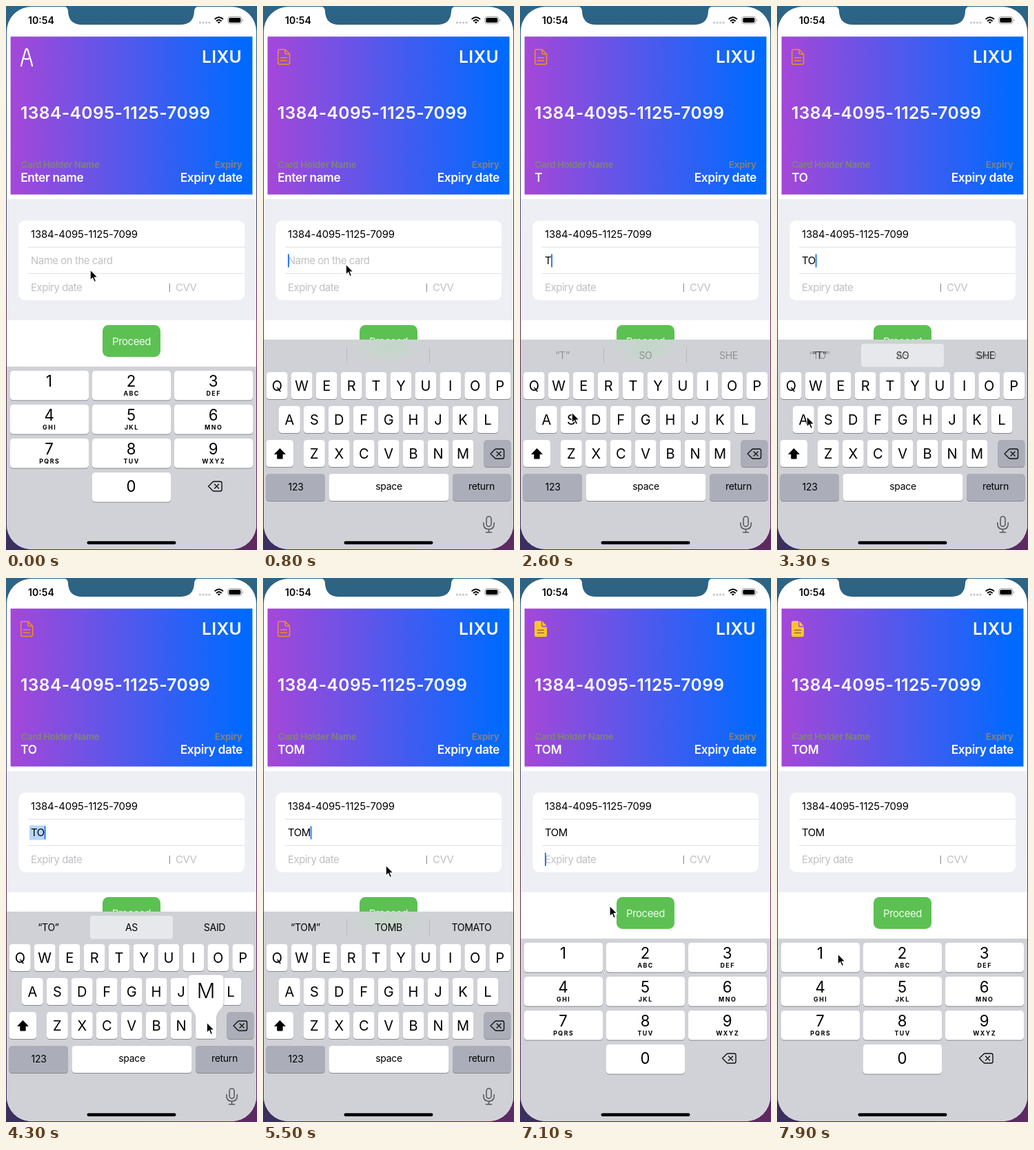
An HTML page that plays this animation: 364x786 px, repeating every 8 s.

```html
<!DOCTYPE html>
<html lang="en">
<head>
<meta charset="utf-8">
<title>Card form</title>
<style>
html, body { margin: 0; height: 100%; overflow: hidden; background: #3c2c5e; }
svg { display: block; width: 364px; height: 786px; }
text { font-family: Inter, "Open Sans", sans-serif; white-space: pre; }
.field { font-size: 14.9px; letter-spacing: -.029em; }
.label { font-size: 13.1px; font-weight: 700; letter-spacing: -.014em; fill: #808080; }
.value { font-size: 17.3px; font-weight: 600; letter-spacing: -.02em; fill: #fff; }
.big { font-size: 24.6px; font-weight: 600; letter-spacing: .016em; fill: #fff; }
.hint { fill: #c0c0c4; }
.digit { font-size: 22.2px; }
.abc { font-size: 8.8px; font-weight: 700; letter-spacing: 1.5px; }
.letter { font-size: 20px; }
.small { font-size: 14px; letter-spacing: -.02em; }
.mid { text-anchor: middle; }
.end { text-anchor: end; }
.line { fill: none; stroke-linecap: round; stroke-linejoin: round; }
</style>
</head>
<body>
<svg id="stage" viewBox="0 0 364 786">
  <defs>
    <linearGradient id="desk" gradientUnits="userSpaceOnUse" x1="0" y1="0" x2="0" y2="786">
      <stop offset="0" stop-color="#2b6587"/><stop offset=".3" stop-color="#3a4c70"/>
      <stop offset=".6" stop-color="#5c2b4b"/><stop offset="1" stop-color="#3a305f"/>
    </linearGradient>
    <linearGradient id="dusk">
      <stop offset=".5" stop-color="#6a2862" stop-opacity="0"/><stop offset="1" stop-color="#6a2862" stop-opacity=".75"/>
    </linearGradient>
    <linearGradient id="card">
      <stop offset="0" stop-color="#a547d8"/><stop offset=".94" stop-color="#0369ff"/>
      <stop offset="1" stop-color="#006aff"/>
    </linearGradient>
    <radialGradient id="glow">
      <stop offset="0" stop-color="#b4dcb8" stop-opacity=".55"/><stop offset="1" stop-color="#c6d8cb" stop-opacity="0"/>
    </radialGradient>
    <clipPath id="screen"><rect x="1" y="1" width="362" height="784" rx="36"/></clipPath>
  </defs>
  <rect width="364" height="786" fill="url(#desk)"/>
  <rect y="393" width="364" height="393" fill="url(#dusk)"/>
  <g clip-path="url(#screen)">
    <rect width="364" height="786" fill="#fff"/>
    <rect x="6.6" y="44.2" width="350.8" height="228.2" fill="url(#card)"/>
    <path id="compass" class="line" stroke="#fff" stroke-width="2.2"
      d="M22 86.5L24 78.5L28.5 63.5Q30 60 31.5 63.5L36 78.5L38 86.5M25.3 75.5Q30 78 34.7 75.5"/>
    <path id="outline" class="line" stroke="#f08c28" stroke-width="1.6"
      d="M24 62.8H32L38.6 69.5V82Q38.6 84.3 36.3 84.3H24Q21.8 84.3 21.8 82V65Q21.8 62.8 24 62.8ZM32 62.8V67.5Q32 69.5 34 69.5H38.6M25.5 74.8H34.5M25.5 79H34.5"/>
    <g id="filled">
      <path d="M23.5 62H31V68Q31 71 34 71H39V82.5Q39 85 36.5 85H23.5Q21 85 21 82.5V64.5Q21 62 23.5 62ZM32.3 62.3L38.8 69.4H34Q32.3 69.4 32.3 67.5Z" fill="#fac42c"/>
      <path class="line" d="M25.5 75.3H34.5M25.5 79.3H34.5" stroke="#86603e" stroke-width="1.3"/>
    </g>
    <text class="big end" x="342" y="82">LIXU</text>
    <text class="big" x="21" y="163.3">1384-4095-1125-7099</text>
    <text class="label" x="21.5" y="234">Card Holder Name</text>
    <text class="label end" x="342.5" y="234">Expiry</text>
    <text class="value" id="holder" x="21.2" y="254"></text>
    <text class="value end" x="343" y="254">Expiry date</text>

    <rect y="279" width="364" height="175" fill="#eeeff5"/>
    <rect x="18.5" y="310" width="327.5" height="115" rx="9" fill="#fff"/>
    <path d="M32 348.5H346M32 386.5H346" stroke="#e2e2e5"/>
    <rect id="mark" x="34" y="357.5" height="21" fill="#b8d5fa"/>
    <text class="field" x="36" y="334.8" style="letter-spacing:-.009em">1384-4095-1125-7099</text>
    <text class="field" id="name" x="36" y="373.3"></text>
    <text class="field hint" x="36" y="411.8">Expiry date</text>
    <path d="M237.3 401V413" stroke="#909094" stroke-width="1.2"/>
    <text class="field hint" x="246" y="411.8">CVV</text>
    <rect id="caret" width="1.8" height="19" fill="#1873e8"/>
    <rect x="140" y="461" width="84" height="46" rx="8.5" fill="#5cc152"/>
    <text class="field mid" x="182" y="489.8" fill="#f2fbf0">Proceed</text>
    <g id="numbers"></g>
    <g id="letters"></g>
    <rect x="117.5" y="773.3" width="129" height="4.4" rx="2.2"/>

    <text x="32" y="25.8" font-size="14.1" font-weight="600">10:54</text>
    <g fill="#c4c4c6"><circle cx="281.5" cy="24" r="1.6"/><circle cx="286" cy="24" r="1.6"/><circle cx="290.5" cy="24" r="1.6"/><circle cx="295" cy="24" r="1.6"/></g>
    <path class="line" d="M303.3 18.6Q308.8 13.8 314.3 18.6M305.6 21.4Q308.8 18.6 312 21.4" stroke="#000" stroke-width="2"/>
    <path d="M306.7 23.3Q308.8 21.7 310.9 23.3L308.8 25.6Z"/>
    <rect x="321.8" y="15.5" width="20" height="10" rx="3" fill="none" stroke="#999"/>
    <rect x="323.3" y="17" width="17" height="7" rx="1.8"/>
    <path d="M343.2 18.5Q345 20.5 343.2 22.5Z" fill="#999"/>
  </g>
  <path d="M82 0Q90 .5 90 8Q91 27 110 27H253Q272 27 273 8Q273 .5 281 0Z" fill="url(#desk)"/>
  <path id="pointer" d="M-.8 0V15.2L2.7 12 5.1 17.6 7.6 16.5 5.2 11H10Z" stroke="#fff" stroke-width="1.1"/>
</svg>
<script>
const $ = id => document.getElementById(id);
const KEY = "#fff", DARK = "#abaeb9";

const label = (s, x, y, cls, extra = "") => `<text class="${cls} mid" x="${x}" y="${y}" ${extra}>${s}</text>`;
const key = (x, y, w, h, fill = KEY) =>
  `<rect x="${x}" y="${y + 1}" width="${w}" height="${h}" rx="4.5" fill="#88898e"/>
   <rect x="${x}" y="${y}" width="${w}" height="${h}" rx="4.5" fill="${fill}"/>`;
const erase = (x, y) =>
  `<path class="line" transform="translate(${x} ${y})" stroke="#111" stroke-width="1.4"
    d="M-10 0L-4 -6Q-3 -7 -1.6 -7H7Q9.5 -7 9.5 -4.5V4.5Q9.5 7 7 7H-1.6Q-3 7 -4 6ZM-1 -3L5 3M5 -3L-1 3"/>`;

function numberPad() {
  const subs = ["", "ABC", "DEF", "GHI", "JKL", "MNO", "PQRS", "TUV", "WXYZ"];
  let s = `<rect y="521" width="364" height="265" fill="#d1d2d7"/>`;
  subs.forEach((sub, i) => {
    const x = 6 + i % 3 * 119, y = 527 + Math.floor(i / 3) * 49;
    s += key(x, y, 114, 42.5) + label(i + 1, x + 56.6, y + 23, "digit") + label(sub, x + 57.2, y + 36, "abc");
  });
  return s + key(125, 674, 114, 42.5) + label(0, 181.6, 702, "digit") + erase(303.5, 694);
}

function letterPad() {
  let s = `<rect y="482" width="364" height="304" fill="#d0d1d6"/>
    <ellipse cx="182" cy="492" rx="65" ry="30" fill="url(#glow)" clip-path="inset(20px 0 0 0)"/>
    <path id="dividers" d="M121.5 493V516M241.5 493V516" stroke="#b8b9be"/>
    <rect id="choice" x="122" y="488" width="120" height="33.5" rx="4" fill="#e7e8eb"/>
    <g id="words"></g>`;
  [["QWERTYUIOP", 20.3], ["ASDFGHJKL", 38.4], ["ZXCVBNM", 74.4]].forEach(([row, x0], r) => {
    [...row].forEach((c, i) => {
      const x = x0 + i * 35.93, y = 529 + r * 49;
      s += key(x - 15.4, y, 30.8, 39) + label(c, x, y + 26.6, "letter");
    });
  });
  s += key(4.5, 627, 39.5, 39) + `<path d="M24.5 639L33 647.7H28.7V653.5Q28.7 654.5 27.7 654.5H21.3Q20.3 654.5 20.3 653.5V647.7H16Z"/>`
    + key(320.3, 627, 39, 39, DARK) + erase(340, 647)
    + key(4.5, 676, 85.5, 39, DARK) + label("123", 47.5, 700, "small")
    + key(95.5, 676, 174, 39) + label("space", 182.5, 699.3, "small")
    + key(275, 676, 84.5, 39, DARK) + label("return", 317, 699.3, "small");
  s += `<g class="line" stroke="#55565b" stroke-width="1.5"><rect x="324" y="737.5" width="7" height="14.5" rx="3.5"/>
    <path d="M319.8 746.5V748Q319.8 756 327.5 756T335.2 748V746.5M327.5 756V760.5M323.5 760.5H331.5"/></g>`;
  return s + `<g id="popup"><path d="M270 573H310Q316 573 316 579V612C316 624 305.5 624 305.5 636V662Q305.5 666 301.5 666H278.5Q274.5 666 274.5 662V636C274.5 624 264 624 264 612V579Q264 573 270 573Z"
    fill="#fff" stroke="#b5b6bb" stroke-width=".7"/>${label("M", 290, 607.3, "", 'font-size="29.5" font-weight="300"')}</g>`;
}

$("numbers").innerHTML = numberPad();
$("letters").innerHTML = letterPad();

const LOOP = 8000, NAME_AT = 800, DATE_AT = 6000;
const typed = [[NAME_AT, ""], [2500, "T"], [3200, "TO"], [4400, "TOM"]];
const words = [[], ["“T”", "SO", "SHE"], ["“TO”", "AS", "SAID"], ["“TOM”", "TOMB", "TOMATO"]];
const path = [[0, 123, 381], [500, 121, 373], [900, 121, 373], [1900, 76, 587], [2600, 76, 587],
  [3100, 44, 593], [3500, 44, 593], [4200, 292, 642], [4500, 292, 642], [5400, 179, 415],
  [5600, 179, 415], [5900, 173, 404], [6500, 173, 404], [7700, 89, 543], [8000, 89, 543]];

const show = (id, on) => $(id).style.display = on ? "" : "none";
const clamp = v => Math.max(0, Math.min(1, v));

function pointerAt(t) {
  const i = path.findIndex(p => p[0] > t), [a, x0, y0] = path[i - 1], [b, x1, y1] = path[i];
  const p = (t - a) / (b - a), e = p * p * (3 - 2 * p);
  return [x0 + (x1 - x0) * e, y0 + (y1 - y0) * e];
}

const wordRow = (list, alpha) => list.map((w, i) =>
  label(w, 61.5 + i * 120.5, 510, "small", `opacity="${alpha}"`)).join("");

function draw(t) {
  const naming = t >= NAME_AT && t < DATE_AT, dating = t >= DATE_AT;
  const n = Math.max(0, typed.filter(k => t >= k[0]).length - 1);
  const [since, text] = typed[n];
  show("compass", t < NAME_AT);
  show("outline", naming);
  show("filled", dating);
  show("numbers", !naming);
  show("letters", naming);

  $("holder").textContent = text || "Enter name";
  $("name").textContent = text || "Name on the card";
  $("name").setAttribute("class", text ? "field" : "field hint");
  const width = text ? $("name").getComputedTextLength() : 0;
  show("mark", t >= 3400 && t < 4400);
  $("mark").setAttribute("width", width + 3);

  const blink = (t - (dating ? DATE_AT : since)) % 1000 < 600;
  show("caret", t >= NAME_AT && blink);
  $("caret").setAttribute("x", dating ? 36 : 36 + width);
  $("caret").setAttribute("y", dating ? 397 : 358.5);

  const choosing = n === 2;
  show("choice", choosing);
  show("dividers", !choosing);
  show("popup", t >= 4200 && t < 4450);
  if (naming) {
    const p = clamp((t - since - 40) / 200);
    $("words").innerHTML = (n > 0 && p < 1 ? wordRow(words[n - 1], 1 - p) : "") + wordRow(words[n], p);
  }
  $("pointer").setAttribute("transform", `translate(${pointerAt(t)})`);
}

const start = performance.now();
function tick() {
  draw((performance.now() - start) % LOOP);
  requestAnimationFrame(tick);
}
tick();
</script>
</body>
</html>
```
